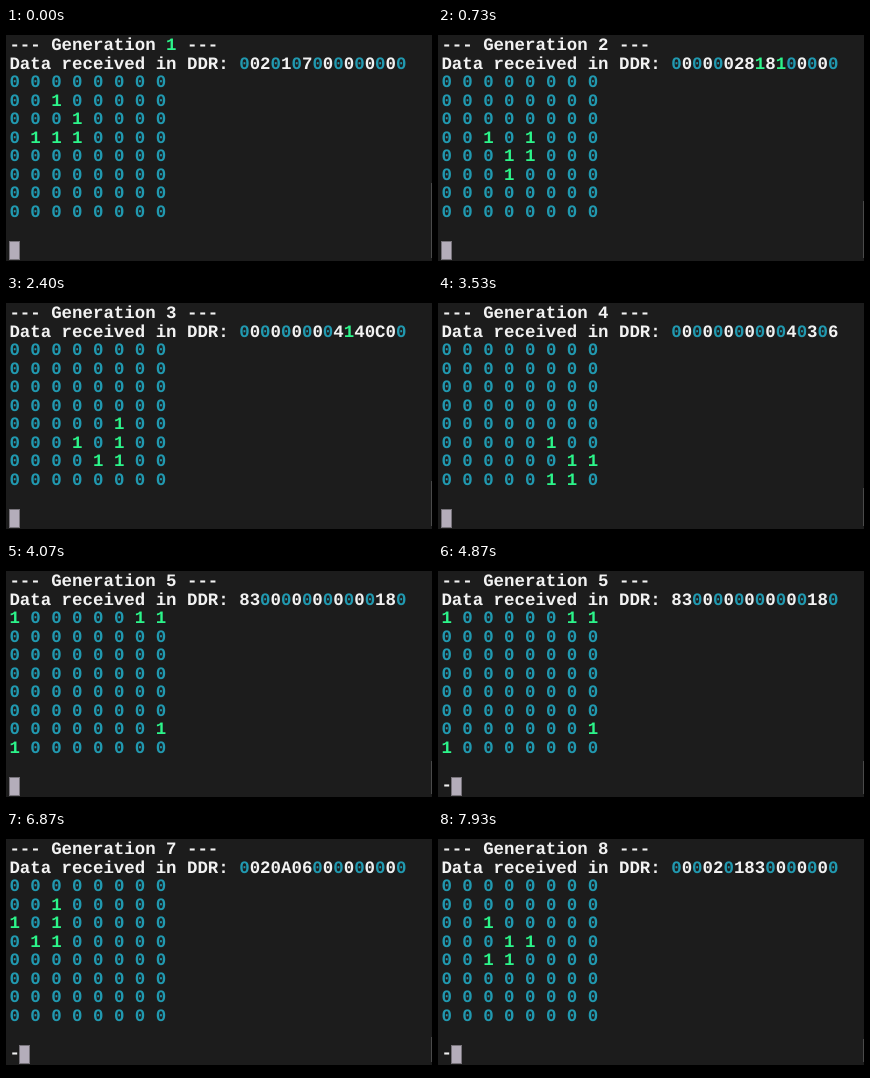
Write an HTML page that moves like this. It is 426 px wide and 240 px high and loops after 8 s.

```html
<!DOCTYPE html>
<html lang="en">
<head>
<meta charset="utf-8">
<title>Life in a terminal</title>
<style>
  html, body { margin: 0; width: 100%; height: 100%; overflow: hidden; background: #000; }
  #term { position: absolute; left: 0; top: 7px; width: 426px; height: 226px; background: #1c1c1c; overflow: hidden; }
  #text {
    position: absolute; left: 3.4px; top: 3.1px; margin: 0;
    font: bold 17.41px/18.55px "Liberation Mono", monospace;
    text-rendering: geometricPrecision; font-variant-ligatures: none;
    color: #f2f2f2;
  }
  .d0 { color: #2199b0; }
  .d1 { color: #2cf58a; }
  #cursor {
    position: absolute; left: 3px; top: 206px; width: 9px; height: 17px;
    border: 1px solid #b4adba99; background: #b4adba padding-box;
  }
  #thumb { position: absolute; right: 0; bottom: 3px; width: 1px; background: #4a4a4a; }
</style>
</head>
<body>
<div id="term">
  <pre id="text"></pre>
  <div id="cursor"></div>
  <div id="thumb"></div>
</div>
<script>
const LOOP = 8000, SIZE = 8, STEPS = 5, ADVANCE = 10.45;
const ROWS = 12, BLOCK = 11, TRACK = 212;
const starts = [0, 730, 1870, 2870, 3870, 4930, 5930, 6930, LOOP];
const DASH_TIME = 70;
const noDash = [0, 5]; // blocks that are replaced without a visible first dash

const $ = id => document.getElementById(id);
const range = [...Array(SIZE).keys()];

function step(grid) {
  const at = (r, c) => grid[(r + SIZE) % SIZE][(c + SIZE) % SIZE];
  return range.map(r => range.map(c => {
    let sum = -at(r, c);
    for (let y = -1; y <= 1; y++)
      for (let x = -1; x <= 1; x++) sum += at(r + y, c + x);
    return +(sum === 3 || (sum === 2 && at(r, c) === 1));
  }));
}

// Terminal highlighting: a 0 also swallows the character after it
function paint(line) {
  return line.replace(/(?<![A-Za-z])(?:0(?![A-Za-z])(.?)|1)/g, (m, next = "") =>
    `<span class="d${m[0]}">${m[0]}</span>${next}`);
}

function block(grid, n) {
  const hex = grid.map(row =>
    parseInt(row.join(""), 2).toString(16).toUpperCase().padStart(2, "0")).join("");
  return [
    `--- Generation ${n} ---`,
    `Data received in DDR: ${hex}`,
    ...grid.map(row => row.join(" ")),
    ""
  ].map(paint).join("\n") + "\n";
}

const glider = ["1,2", "2,3", "3,1", "3,2", "3,3"];
let grid = range.map(r => range.map(c => +glider.includes(`${r},${c}`)));
const screens = starts.slice(0, -1).map((_, i) => {
  const html = block(grid, i + 1);
  for (let k = 0; k < STEPS; k++) grid = step(grid);
  return html;
});

let shown = "";
function draw(now) {
  const t = now % LOOP;
  const i = starts.findIndex(s => s > t) - 1;
  const dash = !noDash.includes(i) && t >= starts[i + 1] - DASH_TIME;
  const key = `${i} ${dash}`;
  if (key === shown) return;
  shown = key;
  $("text").innerHTML = screens[i] + (dash ? "-" : "");
  $("cursor").style.left = 3 + (dash ? ADVANCE : 0) + "px";
  $("thumb").style.height = TRACK * ROWS / (ROWS + BLOCK * (i + 2)) + "px";
}

function tick() {
  draw(performance.now());
  requestAnimationFrame(tick);
}
tick();
</script>
</body>
</html>
```
